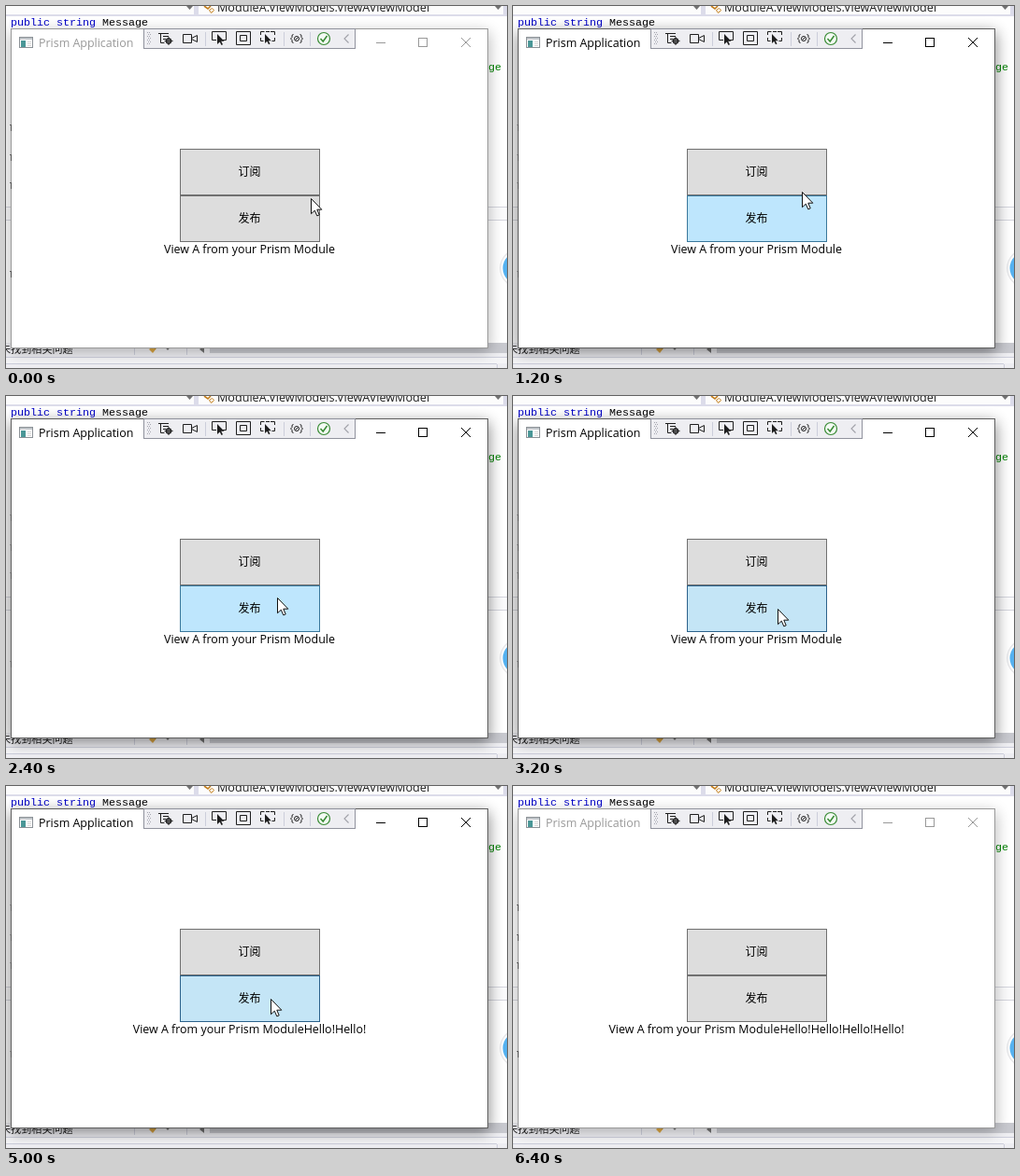
Write an HTML page that moves like this. It is 536 px wide and 388 px high and loops after 6.5 s.

```html
<!DOCTYPE html>
<html lang="zh">
<head>
<meta charset="utf-8">
<title>Prism Application</title>
<style>
html, body { margin: 0; width: 100%; height: 100%; overflow: hidden; background: #fff; }
svg { display: block; width: 536px; height: 388px; }
text { font: 12.45px "Open Sans", "Noto Sans", sans-serif; white-space: pre; }
.cjk { font: 12px "Noto Sans CJK SC", "Noto Sans CJK", sans-serif; }
.code { font: 11.67px "Liberation Mono", monospace; }
.mid { text-anchor: middle; }
.line { fill: none; stroke: #1e1e1e; }
.crisp { shape-rendering: crispEdges; }
</style>
</head>
<body>
<svg viewBox="0 0 536 388">
  <defs>
    <filter id="blur" x="-10%" y="-10%" width="120%" height="120%"><feGaussianBlur stdDeviation="8"/></filter>
  </defs>

  <!-- editor behind the window -->
  <g class="crisp">
    <rect width="536" height="388" fill="#fff"/>
    <rect width="536" height="11" fill="#dcdcea"/>
    <rect width="201" height="9" fill="#fcfcfc"/>
    <rect x="206" width="326" height="9" fill="#fcfcfc"/>
    <rect y="215" width="536" height="14" fill="#fbfbfc"/>
    <path class="line" style="stroke:#d5d6de" d="M0 215.5H536M0 229.5H536"/>
    <rect y="361" width="536" height="27" fill="#eeeef2"/>
    <rect x="218" y="361" width="318" height="11" fill="#c8c9cf"/>
    <path class="line" style="stroke:#cccedb" d="M137.5 361V374M193.5 361V374M0 376.5H536M0 383.5H525M525.5 384V388"/>
    <rect y="377" width="536" height="6" fill="#f5f5f7"/>
  </g>
  <path d="M193 0h7l-3.500 4zM523 0h7l-3.500 4zM170 365.500h6l-3 3.500zM212 364v8l-5-4z" fill="#717171"/>
  <path d="M212 0l4 3 3-3" fill="none" stroke="#c27d1a" stroke-width="1.600"/>
  <path d="M217.500 4.500l3-2 2 2-3 3z" fill="#fff" stroke="#c27d1a"/>
  <text x="226" y="5.500" style="font-size:12.6px" fill="#1e1e1e">ModuleA.ViewModels.ViewAViewModel</text>
  <text class="code" x="5" y="21"><tspan fill="#0000c8">public string</tspan> Message</text>
  <text class="code" x="516" y="69" fill="#008000">ge</text>
  <text class="cjk" x="-6" y="371.500" style="font-size:11.1px" fill="#1e1e1e">未找到相关问题</text>
  <path d="M153 368l5-4 3 3-4 5z" fill="#d9a441"/>
  <path d="M159 367l4-4" stroke="#444" stroke-width="1.500"/>
  <circle cx="549" cy="281" r="21" fill="#e8e8ea"/>
  <circle cx="549" cy="281" r="19.500" fill="#fff"/>
  <circle cx="549" cy="281" r="17.500" fill="#55b2f1"/>

  <!-- application window -->
  <rect id="shadow" x="4" y="28" width="513" height="343" filter="url(#blur)"/>
  <rect id="frame" class="crisp" x="5.500" y="24.500" width="510" height="342" fill="#fff"/>
  <path id="ticks" class="line crisp" d="M4 127.5h1.500v6M4 159.500h1.500v6M4 189.500h1.500v6M4 284.500h1.500v6"/>
  <g id="appIcon">
    <rect x="14.500" y="33.500" width="14" height="11" fill="#fff" stroke="#8b9196"/>
    <rect x="15" y="34" width="13" height="2" fill="#c0c5c9"/>
    <rect x="16" y="37" width="5" height="7" fill="#4a9797"/>
    <path d="M23 38.500h4M23 40.500h4M23 42.500h4" stroke="#d4d4d4"/>
  </g>
  <text id="title" x="35" y="44">Prism Application</text>
  <g id="controls" fill="none" shape-rendering="crispEdges">
    <path d="M396 39.500H406M441.500 34.500H450.500V43.500H441.500Z"/>
    <path d="M487 34l10 10M497 34l-10 10" shape-rendering="auto"/>
  </g>

  <!-- debug toolbar -->
  <rect class="crisp" x="147.500" y="24.500" width="226" height="21" fill="#eeeef2" stroke="#91939e"/>
  <g id="grip" fill="#a5a6b0"></g>
  <path class="line crisp" style="stroke:#cccedb" d="M213.500 28V43M297.500 28V43M325.500 28V43"/>
  <g class="line">
    <path d="M163 29.500h11M165.500 29.500v10h4M168 32.500h6M168 35.500h3"/>
    <circle cx="174" cy="37.500" r="2.500" stroke-width="1.500"/>
    <path d="M174 33v9M169.500 37.500h9"/>
    <path d="M189.500 30.500h9v9h-9zM198.500 34.500l6-3v7l-6-3"/>
    <path d="M225 36.500h-4.500v-9h15v9h-4"/>
    <path d="M246.500 27.500h15v14h-15zM250.500 31.500h7v6h-7z"/>
    <path d="M272.500 31v-3.500h4M283 27.500h4.500V31M272.500 34v3.500h3M287.500 34v3.500h-3M278 27.500h4"/>
    <path d="M307.500 30.500q-1.500 0-1.500 1.500v1.500l-1.500 1.500 1.500 1.500V38q0 1.500 1.500 1.500M314.500 30.500q1.500 0 1.500 1.500v1.500l1.500 1.500-1.500 1.500V38q0 1.500-1.500 1.500"/>
    <circle cx="311" cy="35" r="2.500"/>
    <path d="M309.500 36.500l3-3"/>
  </g>
  <path d="M226 30v11l2.700-2.500 1.800 3.500 1.500-.7-1.800-3.600h3.300zM277 30v10l2.300-2.200 1.700 3.400 1.500-.7-1.700-3.300h3z" fill="#1e1e1e"/>
  <circle cx="340" cy="35" r="6.500" fill="#f3faf3" stroke="#388a34" stroke-width="1.200"/>
  <path d="M336.500 35l2.700 3 4.300-6" fill="none" stroke="#388a34" stroke-width="1.500"/>
  <path d="M366.500 30.500l-4.500 4.500 4.500 4.500" fill="none" stroke="#a0a1a8" stroke-width="1.100"/>

  <!-- content -->
  <rect id="sub" class="crisp" x="186.500" y="153.500" width="149" height="49"/>
  <rect id="pub" class="crisp" x="186.500" y="203.500" width="149" height="49"/>
  <text class="cjk mid" x="260.500" y="182">订阅</text>
  <text class="cjk mid" x="260.500" y="232">发布</text>
  <text id="message" class="mid" x="260.500" y="265"></text>
  <path id="cursor" d="M.5 .5V16.700L4.300 13.200 6.800 18.900 9.200 17.900 6.800 12.200H11.800Z" fill="#fff" stroke="#111"/>
</svg>
<script>
const $ = id => document.getElementById(id);
const LOOP = 6500, STEP = 100;

// [ms, x, y]
const path = [
  [0, 326, 206], [700, 319, 208], [1200, 309, 199], [1500, 303, 189], [1900, 298, 189],
  [2100, 293, 202], [2400, 290, 216], [2900, 283, 228], [5500, 283, 228], [5600, 340, 234],
  [5700, 480, 249], [5900, 524, 264], [6100, 540, 270]
];
// [ms, state]
const subSteps = [[0, 'idle'], [1300, 'hover'], [1600, 'down'], [1900, 'hover'], [2200, 'idle']];
const pubSteps = [
  [0, 'idle'], [100, 'hover'], [1300, 'idle'], [2200, 'hover'],
  [3100, 'down'], [3400, 'hover'], [4000, 'down'], [4400, 'hover'],
  [4800, 'down'], [5100, 'hover'], [5300, 'down'], [5600, 'idle']
];
const activeSteps = [[0, false], [900, true], [6100, false]];
const helloSteps = [[0, 0], [3400, 1], [4400, 2], [5100, 3], [5600, 4]];
const looks = {
  idle: ['#dddddd', '#707070'],
  hover: ['#bee6fd', '#3a789c'],
  down: ['#c4e5f6', '#2c628b']
};

const at = (steps, t) => steps.filter(s => s[0] <= t).pop()[1];

function cursorAt(t) {
  const i = path.findIndex(p => p[0] > t);
  if (i < 0) return path[path.length - 1].slice(1);
  const [t0, x0, y0] = path[i - 1], [t1, x1, y1] = path[i];
  const k = (t - t0) / (t1 - t0);
  return [Math.round(x0 + (x1 - x0) * k), Math.round(y0 + (y1 - y0) * k)];
}

function paint(id, state) {
  const [fill, stroke] = looks[state];
  $(id).setAttribute('fill', fill);
  $(id).setAttribute('stroke', stroke);
}

function render(ms) {
  const t = Math.floor(ms % LOOP / STEP) * STEP;
  const active = at(activeSteps, t);
  const [x, y] = cursorAt(t);
  paint('sub', at(subSteps, t));
  paint('pub', at(pubSteps, t));
  $('message').textContent = 'View A from your Prism Module' + 'Hello!'.repeat(at(helloSteps, t));
  $('cursor').setAttribute('transform', `translate(${x} ${y})`);
  $('shadow').setAttribute('opacity', active ? 0.45 : 0.27);
  $('frame').setAttribute('stroke', active ? '#606060' : '#9a9a9a');
  $('ticks').setAttribute('opacity', active ? 0.25 : 0.6);
  $('title').setAttribute('fill', active ? '#000' : '#999');
  $('controls').setAttribute('stroke', active ? '#000' : '#999');
}

for (let i = 0; i < 14; i++) {
  const dot = document.createElementNS('http://www.w3.org/2000/svg', 'rect');
  dot.setAttribute('x', 151 + i % 2 * 2 + (i >> 1) % 2);
  dot.setAttribute('y', 28 + (i >> 1) * 2);
  dot.setAttribute('width', 1);
  dot.setAttribute('height', 1);
  $('grip').append(dot);
}

const start = performance.now();
function tick() {
  render(performance.now() - start);
  requestAnimationFrame(tick);
}
tick();
</script>
</body>
</html>
```
